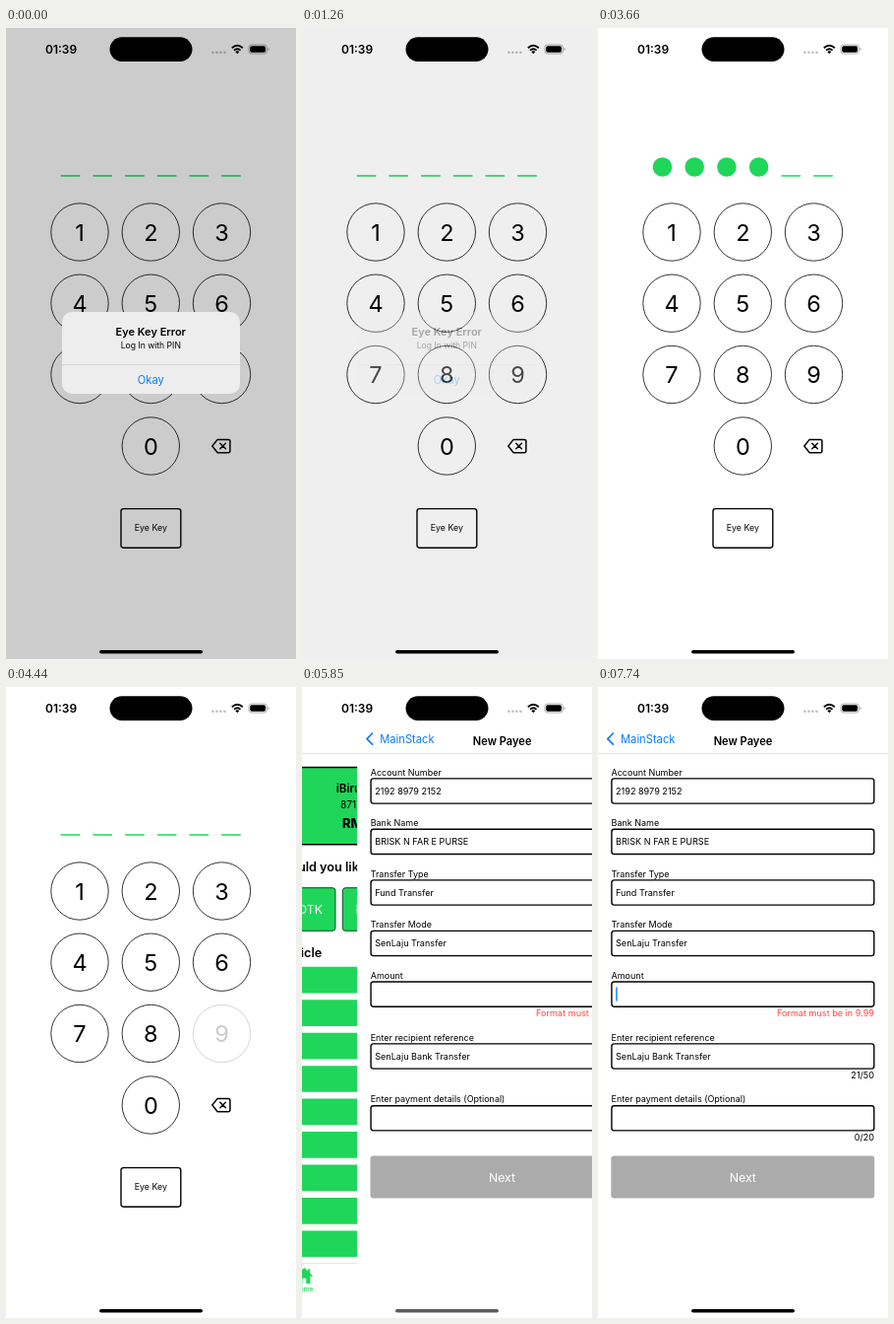
An HTML page that plays this animation: 295 by 640 pixels, repeating every 8000 ms.

```html
<!DOCTYPE html>
<html lang="en">
<head>
<meta charset="utf-8">
<title>PIN login and transfer</title>
<style>
  html, body { margin: 0; width: 100%; height: 100%; overflow: hidden; background: #fff; }
  svg { display: block; width: 295px; height: 640px; font-family: Inter, "Open Sans", sans-serif; }
</style>
</head>
<body>
<svg id="stage" viewBox="0 0 295 640"></svg>
<script>
const GREEN = '#20d65a', BLUE = '#0a7cff', LOOP = 8000;
const KEY_X = [75, 147.3, 219.5], KEY_Y = [207, 279.2, 351.5, 424];
const slotX = i => 65.5 + i * 32.7;
const range = n => [...Array(n).keys()];

const text = (s, x, y, size, { fill = '#000', weight = 400, anchor = 'start' } = {}) =>
  `<text x="${x}" y="${y}" font-size="${size}" fill="${fill}" font-weight="${weight}" text-anchor="${anchor}">${s}</text>`;
const mid = (s, x, y, size, style) => text(s, x, y, size, { anchor: 'middle', ...style });
const rect = (x, y, w, h, rx, attrs = '') =>
  `<rect x="${x}" y="${y}" width="${w}" height="${h}" rx="${rx}" ${attrs}/>`;
const path = (d, attrs) => `<path d="${d}" ${attrs}/>`;
const line = (color, width) =>
  `fill="none" stroke="${color}" stroke-width="${width}" stroke-linecap="round" stroke-linejoin="round"`;
const group = (id, content) => `<g id="${id}">${content}</g>`;

const header = title =>
  rect(0, 0, 295, 640, 0, 'fill="#fff"') +
  rect(0, 67.2, 295, 0.7, 0, 'fill="#d4d4d4"') +
  mid(title, 147.5, 58.5, 11.1, { weight: 600 });

function pinScreen() {
  const slots = range(6).map(i =>
    rect(slotX(i) - 9.8, 149.2, 19.6, 1.5, 0, `id="dash${i}" fill="${GREEN}"`) +
    `<circle id="dot${i}" cx="${slotX(i)}" cy="141" r="9.8" fill="${GREEN}"/>`).join('');
  const key = (n, x, y) => group('key' + n,
    `<circle cx="${x}" cy="${y}" r="29.2" fill="none" stroke="#000" stroke-width=".8"/>` + mid(n, x, y + 8.5, 23.5));
  const keys = range(9).map(i => key(i + 1, KEY_X[i % 3], KEY_Y[Math.floor(i / 3)])).join('');
  const erase = path('M215.2 417.4H226.2a1.7 1.7 0 0 1 1.7 1.7V429a1.7 1.7 0 0 1-1.7 1.7H215.2L209.8 424ZM217.8 421.2l5.6 5.6m0-5.6l-5.6 5.6', line('#000', 1.5));
  return rect(0, 0, 295, 640, 0, 'fill="#fff"') + slots + keys + key(0, KEY_X[1], KEY_Y[3]) + erase +
    rect(117, 487.6, 60.8, 39.6, 2.6, line('#000', 1.4)) + mid('Eye Key', 147.3, 510.4, 8.8);
}

function homeScreen() {
  const button = (id, s, x, w) => group(id,
    rect(x, 203.7, w, 43.6, 3, `fill="${GREEN}" stroke="#0b4a20" stroke-width="1"`) +
    mid(s, x + w / 2, 230.4, 12.3, { fill: '#fff' }));
  const bars = range(9).map(i => rect(13.3, 283.8 + i * 33.45, 267.9, 26.7, 3, `fill="${GREEN}"`)).join('');
  return header('Home') +
    rect(13.9, 81.5, 266.9, 78.3, 3, `fill="${GREEN}" stroke="#000" stroke-width="1.4"`) +
    mid('iBirun Account', 147.3, 107, 11.6, { weight: 600 }) +
    mid('8713 2192 1263', 147.3, 123.4, 10.2) +
    mid('RM 323.69', 147.3, 142.6, 13, { weight: 800 }) +
    text('What would you like to do today', 13.3, 187, 12.7, { weight: 600 }) +
    button('sign', 'SignedOTK', 13.8, 91.4) +
    button('transfer', 'New Transfer', 112.5, 105) +
    button('bill', 'SOMBil', 225.3, 77) +
    text('News Article', 13.3, 273.8, 12.7, { weight: 600 }) + bars +
    rect(0, 584, 295, 0.7, 0, 'fill="#dcdcdc"') +
    path('M73.6 589L65 597.3L66.1 598.4L67.6 597V605.2H71.7V599.8H75.5V605.2H79.6V597L81.1 598.4L82.2 597.3L79.4 594.6V590.3H77.4V592.6Z', `fill="${GREEN}"`) +
    mid('Home', 73.5, 613, 6.7, { fill: GREEN, weight: 500 }) +
    `<circle cx="221" cy="597" r="6.7" ${line('#8e8e93', 1.2)}/><circle cx="221" cy="595" r="2.5" fill="#8e8e93"/>` +
    path('M216.4 601.4Q221 596.2 225.6 601.4Q221 605.6 216.4 601.4Z', 'fill="#8e8e93"') +
    mid('Profile', 221, 613, 6.7, { fill: '#8e8e93', weight: 500 });
}

function formScreen() {
  const field = ([label, y, value]) =>
    text(label, 13.5, y - 2.7, 9) + rect(13.9, y + 0.7, 266.9, 25.2, 2.6, line('#000', 1.4)) +
    text(value, 18, y + 16.4, 9.1);
  const fields = [
    ['Account Number', 92.2, '2192 8979 2152'],
    ['Bank Name', 143.6, 'BRISK N FAR E PURSE'],
    ['Transfer Type', 195.2, 'Fund Transfer'],
    ['Transfer Mode', 246.7, 'SenLaju Transfer'],
    ['Amount', 298.3, ''],
    ['Enter recipient reference', 361.2, 'SenLaju Bank Transfer'],
    ['Enter payment details (Optional)', 424, '']
  ];
  const note = (s, y, fill) => text(s, 281, y, 9.1, { fill, anchor: 'end' });
  return header('New Payee') +
    path('M15.4 47L9.8 52.6L15.4 58.2', line(BLUE, 1.7)) +
    text('MainStack', 23, 56.6, 11.2, { fill: BLUE }) +
    fields.map(field).join('') +
    rect(18.2, 304.3, 1.4, 14.4, 0.7, `id="cursor" fill="${BLUE}"`) +
    note('Format must be in 9.99', 333.8, '#ff453f') + note('21/50', 396.8) + note('0/20', 459.8) +
    rect(13.3, 475.6, 267.9, 42.8, 3, 'fill="#ababab"') +
    mid('Next', 147.3, 501.6, 12.3, { fill: '#fff' });
}

function statusBar() {
  const signal = range(4).map(i => `<circle cx="${210.4 + i * 4}" cy="24.7" r="1.3" fill="#bdbdbd"/>`).join('');
  return text('01:39', 40, 25.8, 12, { weight: 600 }) +
    rect(105.5, 9.3, 84, 24.6, 12.3) + signal +
    path('M229.8 20.2Q235.3 15.4 240.8 20.2M232 22.6Q235.3 19.8 238.6 22.6', 'fill="none" stroke="#000" stroke-width="1.8"') +
    path('M233.2 24Q235.3 22.4 237.4 24L235.3 26.2Z', '') +
    rect(246.9, 17, 18.5, 9, 2.9, 'fill="none" stroke="#999" stroke-width=".8"') +
    rect(248.2, 18.3, 15.9, 6.4, 1.8) + path('M266.6 20a1.6 1.6 0 0 1 0 3Z', 'fill="#999"');
}

const alertBox =
  rect(57, 288, 181, 83, 10, 'fill="#ededed"') + rect(57, 341.5, 181, 0.6, 0, 'fill="#c4c4c4"') +
  mid('Eye Key Error', 147.3, 312, 11, { weight: 600 }) +
  mid('Log In with PIN', 147.3, 325.4, 8.6) +
  mid('Okay', 147.3, 361, 11.1, { fill: BLUE });

const stage = document.getElementById('stage');
stage.innerHTML = group('pin', pinScreen()) + group('home', homeScreen()) + group('form', formScreen()) +
  statusBar() + rect(95, 631, 105, 3.6, 1.8, 'id="indicator"') +
  rect(0, 0, 295, 640, 0, 'id="shade"') + group('alert', alertBox);

const el = {};
stage.querySelectorAll('[id]').forEach(node => el[node.id] = node);
const show = (node, on) => node.setAttribute('display', on ? 'inline' : 'none');
const fade = (node, a) => node.setAttribute('opacity', a);
const move = (node, x) => node.setAttribute('transform', `translate(${x} 0)`);
const progress = (t, from, to) => Math.min(1, Math.max(0, (t - from) / (to - from)));

// Each press: touch, release, fully restored
const presses = [[2150, 2270, 2480], [2620, 2720, 2820], [3040, 3140, 3240],
                 [3460, 3560, 3660], [3810, 3950, 4160], [4340, 4440, 4600]];
const TRANSFER = [5490, 5620, 5840], PIN_CLEARED = 4440;
const pressed = (t, [down, up, end]) => t < down ? 1 : 0.2 + 0.8 * progress(t, up, end);

function draw(t) {
  const modal = (1 - progress(t, 1020, 1600)) ** 2.2;
  fade(el.shade, 0.2 * modal);
  fade(el.alert, modal);

  fade(el.key9, Math.min(...presses.map(p => t < p[2] ? pressed(t, p) : 1)));
  const entered = t < PIN_CLEARED ? presses.filter(p => t >= p[1]).length : 0;
  for (const i of range(6)) {
    show(el['dot' + i], i < entered);
    show(el['dash' + i], i >= entered);
  }

  show(el.pin, t < 4600);
  show(el.home, t >= 4600);
  fade(el.transfer, pressed(t, TRANSFER));

  // Critically damped push with parallax behind
  const w = Math.max(0, t - 5640) * 0.0145;
  const rest = t < 6670 ? (1 + w) * Math.exp(-w) : 0;
  show(el.form, t >= 5640);
  move(el.form, 295 * rest);
  move(el.home, -88 * (1 - rest));
  el.indicator.setAttribute('fill', t >= 5840 && t < 6670 ? '#5c5c5c' : '#000');

  fade(el.cursor, t < 6670 ? 0 : t < 7380 ? 1 : t < 7620 ? 0 : 0.5 + 0.5 * progress(t, 7620, 7740));
}

const start = performance.now();
function tick() {
  draw((performance.now() - start) % LOOP);
  requestAnimationFrame(tick);
}
tick();
</script>
</body>
</html>
```
